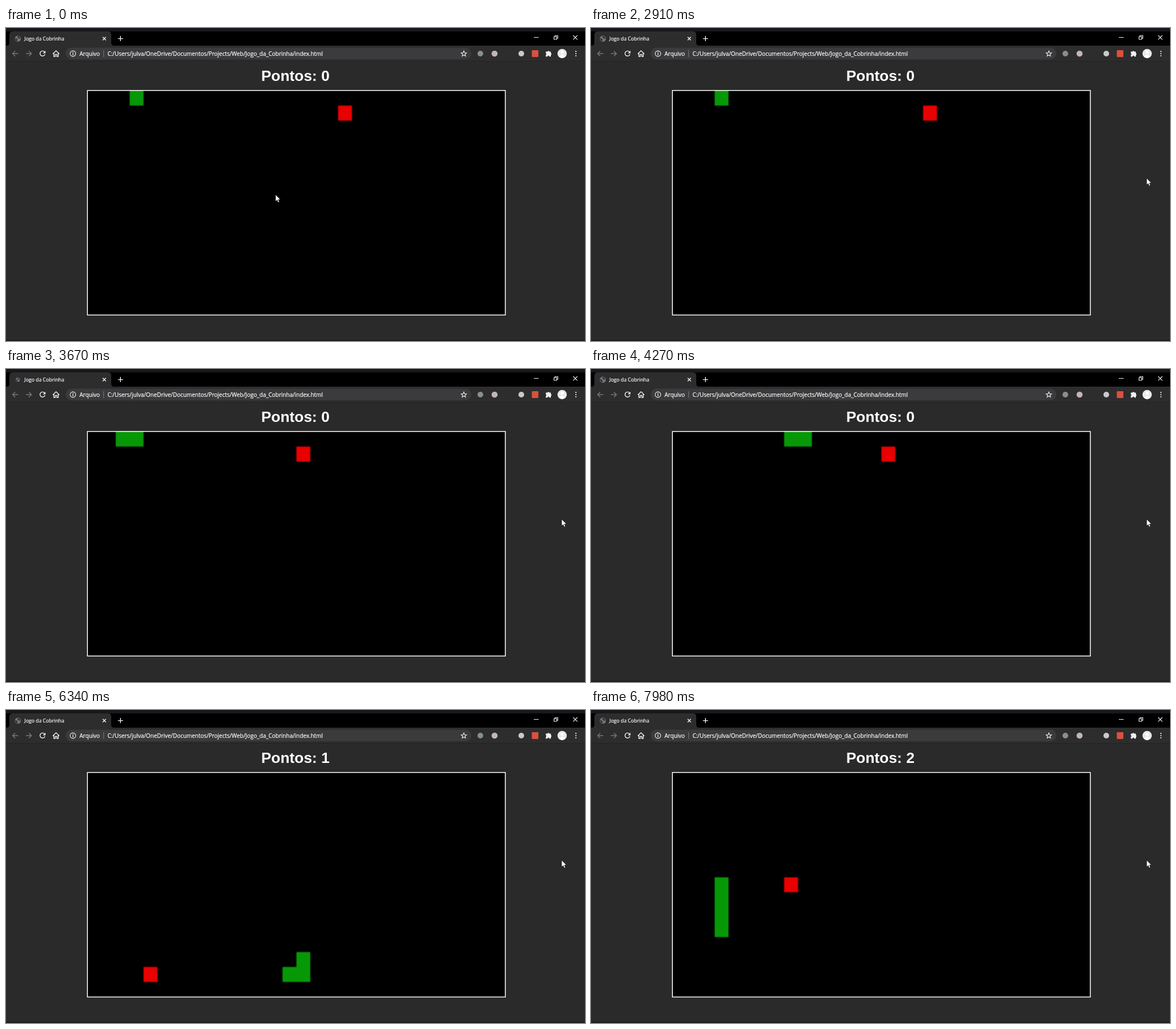
These frames come from a looping animation (1018 by 550 pixels, 8000 ms). An HTML page with a canvas:

```html
<!DOCTYPE html>
<html lang="pt-BR">
<head>
<meta charset="utf-8">
<title>Jogo da Cobrinha</title>
<style>
  html, body { margin: 0; width: 100%; height: 100%; overflow: hidden; background: #2a2a2a; }
  #stage { position: absolute; left: 0; top: 0; width: 1018px; height: 550px; overflow: hidden; }
  #stage > * { position: absolute; left: 0; top: 0; }
  #board { left: 144px; top: 110px; width: 733px; height: 394px; }
  text { font-family: "Open Sans", "Noto Sans", sans-serif; font-size: 9.93px; fill: #fff; stroke: #fff; stroke-width: .2; }
  .title { font-size: 8.75px; }
  .score { font: bold 26.4px "Liberation Sans", Arial, sans-serif; stroke: none; }
  .line { fill: none; stroke: #f1f1f1; stroke-width: 1.4; }
  .dim { stroke: #777; }
  .thin { stroke-width: 1.1; }
</style>
</head>
<body>
<div id="stage">
  <svg width="1018" height="550">
    <!-- window frame -->
    <rect width="1018" height="550" fill="#2a2a2a"/>
    <rect width="1018" height="6" fill="#19181c"/>
    <rect y="6" width="1018" height="25" fill="#000"/>
    <rect y="31" width="1018" height="27" fill="#2d2d2d"/>
    <rect y="58" width="1018" height="1" fill="#222"/>
    <rect y="548" width="1018" height="2" fill="#1f1b20"/>
    <path d="M1 31Q6 31 6 26V12Q6 6 12 6H180Q185 6 185 12V26Q185 31 190 31Z" fill="#2d2d2d"/>

    <!-- tab strip -->
    <g id="favicon">
      <circle r="5.3" fill="#777a7d"/>
      <path d="M-4.6 -1.5L-1 .2L0 2.3L-1.4 4.8Q-5 3.5 -4.6 -1.5ZM0 -4.6L3 -3.6L4.6 -.6L2.4 .8L.5 -1.2L-1.4 -2.4Z" fill="#37383a"/>
    </g>
    <text class="title" x="32.3" y="21.8">Jogo da Cobrinha</text>
    <path class="line" d="M170 15.8L175.6 21.4M175.6 15.8L170 21.4"/>
    <path class="line" d="M196.8 18.6H205.8M201.3 14.1V23.1"/>
    <path class="line thin" d="M928 16.5H936.5M963.5 15.2H968.3V20H963.5ZM965.2 15V13.3H970.2V18.2H968.5M997.2 13L1004.6 20.4M1004.6 13L997.2 20.4"/>

    <!-- toolbar -->
    <path class="line dim" d="M21.5 45H12M16.2 40.5L11.7 45L16.2 49.5M35 45H44.5M40.3 40.5L44.8 45L40.3 49.5"/>
    <path class="line" d="M67.6 42A4.4 4.4 0 1 0 68.4 46.2"/>
    <path d="M69.4 39.8V44.4H64.8Z" fill="#f1f1f1"/>
    <path class="line" d="M82.3 45.4L88 40L93.7 45.4M84.2 44.4V50H86.6V46.4H89.4V50H91.8V44.4"/>
    <rect x="105" y="34.5" width="713" height="20.5" rx="10.2" fill="#3b3b3d"/>
    <circle class="line thin" cx="117.7" cy="45" r="4.9"/>
    <path class="line" d="M117.7 44.3V47.8M117.7 42.1V43.4"/>
    <text x="129.3" y="48.5">Arquivo</text>
    <path class="line dim thin" d="M171.7 39V51"/>
    <text x="178.4" y="48.5">C:/Users/julva/OneDrive/Documentos/Projects/Web/Jogo_da_Cobrinha/index.html</text>
    <path id="star" class="line thin"/>
    <circle cx="834" cy="45" r="5" fill="#8b8d90"/>
    <circle cx="859" cy="45" r="5.3" fill="#c4b4b9"/>
    <circle cx="906" cy="45" r="5" fill="#c9c9c9"/>
    <rect x="924.5" y="39" width="11.5" height="12" rx="1" fill="#d9513f"/>
    <path d="M949 41.5H952A1.7 1.7 0 0 1 955.2 41.5H958V44.2A1.7 1.7 0 0 1 958 47.4V50.2H955.3A1.6 1.6 0 0 0 952.1 50.2H949V47.2A1.6 1.6 0 0 0 949 44.2Z" fill="#f1f1f1"/>
    <circle cx="977.8" cy="45" r="8.2" fill="#e9e9e9"/>
    <circle cx="977.8" cy="42.5" r="2.8" fill="#fff"/>
    <path d="M972.5 50Q977.8 44 983.1 50Q977.8 54 972.5 50Z" fill="#fff"/>
    <g fill="#f1f1f1"><circle cx="1002" cy="41.2" r="1.1"/><circle cx="1002" cy="45" r="1.1"/><circle cx="1002" cy="48.8" r="1.1"/></g>

    <!-- page -->
    <text class="score" id="score" x="448.7" y="93.2">Pontos: 0</text>
  </svg>
  <canvas id="board" width="300" height="150"></canvas>
  <svg width="1018" height="550">
    <rect x="143.2" y="109.75" width="734.7" height="394.6" fill="none" stroke="#fdfdfd" stroke-width="1.5"/>
    <path id="cursor" d="M0 0V11.6L2.7 9.2L4.5 13.4L6.5 12.5L4.7 8.5H8.3Z" fill="#fff" stroke="#000" stroke-width=".5"/>
  </svg>
</div>
<script>
  const LOOP = 8000, START = 3455, STEP = 100;
  const GREEN = '#079807', RED = '#e90000';
  const $ = id => document.getElementById(id);
  const ctx = $('board').getContext('2d');

  // time, x, y of the pointer tip
  const pointer = [[0, 474, 293], [500, 474, 293], [1000, 487, 299], [1500, 487, 299], [2300, 977, 264], [LOOP, 977, 264]];

  $('star').setAttribute('d', 'M' + Array.from({ length: 10 }, (_, i) => {
    const r = i % 2 ? 2.2 : 5, a = (i / 5 - 0.5) * Math.PI;
    return `${805 + r * Math.cos(a)} ${45.3 + r * Math.sin(a)}`;
  }).join('L') + 'Z');

  // cell of the snake's route: right, down, left, up
  function route(n) {
    if (n <= 15) return [n, 0];
    if (n <= 28) return [15, n - 15];
    if (n <= 40) return [43 - n, 13];
    return [3, 53 - n];
  }

  function cell([x, y], color) {
    ctx.fillStyle = color;
    ctx.fillRect(x * 10, y * 10, 10, 10);
  }

  function clear(color) {
    ctx.fillStyle = color;
    ctx.fillRect(0, 0, 300, 150);
  }

  function drawGame(t) {
    let score = 0;
    if (t < START) {
      clear('#000');
      cell([18, 1], RED);
      cell([3, 0], GREEN);
    } else {
      const head = 1 + Math.floor((t - START) / STEP);
      score = (head >= 16) + (head >= 39);
      clear(head > 1 ? '#000' : '#fdfdfd');
      if (head > 1) cell([[15, 1], [4, 13], [8, 7]][score], RED);
      for (let i = 0; i < 2 + score; i++) cell(route(head - i), GREEN);
    }
    $('score').textContent = 'Pontos: ' + score;
  }

  function drawPointer(t) {
    const i = pointer.findIndex(p => p[0] > t);
    const [t0, x0, y0] = pointer[i - 1], [t1, x1, y1] = pointer[i];
    const u = (t - t0) / (t1 - t0), e = u * u * (3 - 2 * u);
    $('cursor').setAttribute('transform', `translate(${x0 + (x1 - x0) * e} ${y0 + (y1 - y0) * e})`);
  }

  const origin = performance.now();
  function frame() {
    const t = (performance.now() - origin) % LOOP;
    const loading = t >= 3400 && t < 3700;
    $('favicon').setAttribute('transform', `translate(20.8 18.7) scale(${loading ? 0.68 : 1})`);
    drawGame(t);
    drawPointer(t);
    requestAnimationFrame(frame);
  }
  frame();
</script>
</body>
</html>
```
